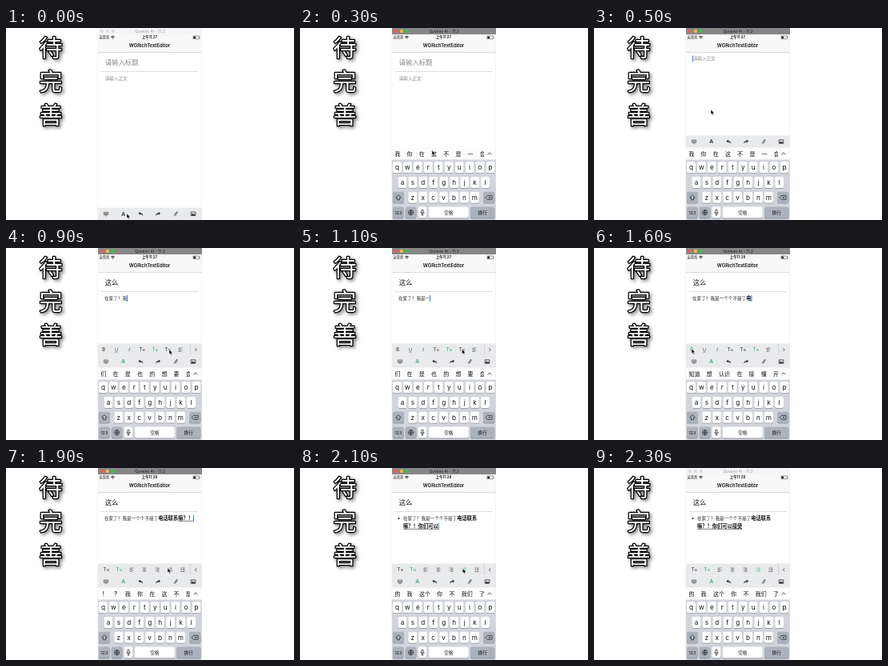
Write an HTML page with a canvas that moves like this. It is 360 px wide and 240 px high and loops after 2.4 s.

```html
<!DOCTYPE html>
<html lang="zh-CN">
<meta charset="utf-8">
<style>
html, body { margin: 0; height: 100%; overflow: hidden; background: #fff }
canvas { display: block }
</style>
<canvas id="stage" width="360" height="240"></canvas>
<script>
const c = document.getElementById('stage').getContext('2d');
const FONT = 'Inter, "Noto Sans CJK SC", "Noto Sans CJK", sans-serif';
const CJK = '"Noto Sans CJK SC", "Noto Sans CJK", sans-serif';
const GREEN = '#36b67b', INK = '#333';
const BODY = '在家了？我是一个个不接了电话联系嘛？！你们可以接受';
const BOLD_AT = 12, LINE_AT = 16;
// Characters typed in the body at each step
const TYPED = [0, 0, 0, 0, 0, 0, 1, 2, 4, 5, 6, 7, 8, 9, 10, 12, 13, 15, 17, 19, 21, 23, 25, 25];
// Pointer path: step, x, y
const POINTER = [[0, 151, 232], [1, 149, 46], [3, 165, 153], [5, 146, 102], [7, 147, 141],
  [9, 204, 127], [14, 200, 126], [15, 202, 126], [16, 122, 126], [17, 237, 126], [19, 202, 125], [22, 204, 126]];
// Suggestions: first step, words
const WORDS = [[0, '我 你 在 这 不 是 一 会'], [9, '们 在 是 也 的 想 要 会'],
  [14, '知道 想 认识 在 接 懂 开心'], [19, '! ? 我 你 在 这 不 是'], [20, '的 我 这个 你 不 我们 了']];

function box(x, y, w, h, color, r = 0) {
  c.fillStyle = color;
  c.beginPath();
  c.roundRect(x, y, w, h, r);
  c.fill();
}

function text(s, x, y, size, color = '#111', align = 'center', weight = 400, font = FONT) {
  c.font = `${weight} ${size}px ${font}`;
  c.textAlign = align;
  c.textBaseline = 'middle';
  c.fillStyle = color;
  c.fillText(s, x, y);
}

function icon(path, x, y, color = INK, width = .8, fill) {
  c.save();
  c.translate(x, y);
  c.lineWidth = width;
  c.strokeStyle = color;
  const p = new Path2D(path);
  if (fill) {
    c.fillStyle = fill;
    c.fill(p);
  }
  c.stroke(p);
  c.restore();
}

function clip(x, y, w, h, draw) {
  c.save();
  c.beginPath();
  c.rect(x, y, w, h);
  c.clip();
  draw();
  c.restore();
}

const disc = (x, y, r, color) => box(x - r, y - r, 2 * r, 2 * r, color, r);

function heading() {
  [...'待完善'].forEach((ch, i) => {
    const y = 25 + 42 * i;
    c.save();
    c.shadowColor = 'rgba(0,0,0,.5)';
    c.shadowBlur = 4;
    c.shadowOffsetX = c.shadowOffsetY = 2;
    c.font = `500 29px ${CJK}`;
    c.textAlign = 'center';
    c.textBaseline = 'middle';
    c.lineJoin = 'round';
    c.lineWidth = 2.5;
    c.strokeStyle = '#000';
    c.strokeText(ch, 56, y);
    c.restore();
    text(ch, 56, y, 29, '#fff', 'center', 500, CJK);
  });
}

function chrome(step) {
  const active = step > 0 && step < 23;
  box(115, 0, 130, 8, active ? '#868686' : '#f5f5f5');
  ['#fb5b55', '#f5b935', '#35c649'].forEach((col, i) => disc(120 + 6.8 * i, 3.9, 2.2, active ? col : '#dcdcdc'));
  text('Quveno 4t - 11.2', 180, 4.2, 4.9, active ? '#1c1c1c' : '#999');
  box(115, 8, 130, 22.5, '#f8f8f8');
  box(115, 30.5, 130, .5, '#bbb');
  text('运营商', 116.5, 11.8, 4.2, '#111', 'left', 500);
  icon('M-2.2-.6Q0-2.6 2.2-.6M-1.2.5Q0-.6 1.2.5M-.3 1.4H.3', 133.5, 11.8, '#111', 1);
  text(step < 15 ? '上午11:27' : '上午11:28', 179.5, 11.8, 4.4, '#111', 'center', 600);
  icon('M0 0H7.5V3.6H0ZM8.5 1.2V2.4', 234, 10, '#333', .5);
  box(234.5, 10.5, 2.4, 2.6, '#111');
  text('WGRichTextEditor', 179.5, 22.7, 5.9, '#111', 'center', 600);
}

function caret(x, y, h = 8) {
  box(x, y - h / 2, 1, h, '#3f78e0');
}

function body(step, y) {
  const n = TYPED[step], list = step >= 20;
  if (!n) {
    text('请输入正文', 123.7, y, 5.6, '#888', 'left');
    if (step == 5) caret(122.8, y);
    return;
  }
  const left = list ? 129 : 123;
  let x = left;
  if (list) disc(123.5, y, 1, '#111');
  for (let i = 0; i < n; i++) {
    if (list && i == LINE_AT) { x = left; y += 10; }
    const bold = i >= BOLD_AT, size = bold ? 6.25 : 5.6;
    text(BODY[i], x, y, size, bold ? '#111' : '#222', 'left', bold ? 700 : 400, CJK);
    if (i >= LINE_AT) box(x, y + 3, size, .6, '#222');
    x += size;
  }
  if (step < 23) caret(x, y);
}

function page(step) {
  const scroll = step == 5 || step == 6 ? 24.5 : 0;
  clip(115, 31, 130, 209, () => {
    const typed = step >= 4;
    text(typed ? '这么' : '请输入标题', 123.7, 43.4 - scroll, 8.4, typed ? '#111' : '#888', 'left');
    if (step == 2 || step == 4) caret(step == 4 ? 140.8 : 123, 43, 10);
    for (let x = 119; x < 241; x += 2) box(x, 54 - scroll, 1, .7, '#aaa');
    body(step, 62.9 - scroll);
  });
}

function toolbar(y, on) {
  box(115, y - 7.5, 130, 15, '#e9eaec');
  icon('M-2.6-2H2.6V1.3H-2.6ZM-1.8-.9H1.8M-1.8.3H1.8M-1 2.6H1', 125, y, '#555', .7);
  text('A', 146.8, y + .3, 6.5, on ? GREEN : INK, 'center', 700);
  icon('M-2.8-.5L-.7-2.2V-1.1Q2.6-1 2.8 2.2Q1.6.2-.7.2V1.2Z', 168.3, y, INK, .3, INK);
  icon('M2.8-.5L.7-2.2V-1.1Q-2.6-1-2.8 2.2Q-1.6.2 .7.2V1.2Z', 190.2, y, INK, .3, INK);
  icon('M-2 2.3L1-2.3M-.5 2.5L2.3-1.8M1-2.3Q2-3 2.3-1.8', 212, y, INK, .8);
  icon('M-2.8-2.2H2.8V2.2H-2.8Z', 234, y, INK, .8);
  icon('M-2.5 2L-.8-.6L.4.9L1.3 0L2.5 2Z', 234, y, INK, .3, INK);
}

function formats(step) {
  const y = 127.2, scrolled = step >= 17, grey = '#4a4a4a';
  box(115, 119.5, 130, 15, '#e9eaec');
  clip(115, 119, 115, 16, () => {
    const at = i => 122 + 16 * i - (scrolled ? 61 : 0);
    text('B', at(0), y, 5.6, step >= 16 ? GREEN : grey, 'center', 600);
    text('U', at(1), y - .3, 5.4, grey);
    box(at(1) - 2, y + 2.6, 4, .5, grey);
    text('I', at(2), y, 6, grey, 'center', 'italic 400', '"Liberation Serif", serif');
    [14, 16, 18].forEach((size, i) => {
      const col = i == (step >= 15 ? 2 : 1) ? GREEN : grey;
      text('T', at(3 + i) - 1.6, y, 6, col, 'center', 500);
      text(size, at(3 + i) + 2, y + .8, 3.4, col, 'center', 500);
    });
    // Left, centred and right alignment
    [-2.5, -1.5, -.5].forEach((x, i) =>
      icon(`M-2.5-2.2H2.5M${x}-.7H${x + 3}M-2.5.8H2.5M${x} 2.3H${x + 3}`, at(6 + i), y, grey, .6));
    icon('M-.8-2H2.7M-.8 0H2.7M-.8 2H2.7M-2.7-2H-1.9M-2.7 0H-1.9M-2.7 2H-1.9', at(9), y, step >= 20 ? GREEN : grey, .7);
    icon('M-2.5-2.2H2.5M0-.7H2.5M0 .8H2.5M-2.5 2.3H2.5M-2.5-1L-1 0L-2.5 1', at(10), y, grey, .6);
  });
  box(230, 120, .6, 14, '#c5c6c8');
  icon(scrolled ? 'M1-2L-1 0L1 2' : 'M-1-2L1 0L-1 2', 237.3, y, '#444', .8);
}

function key(x, y, w, label, dark, size = 8.2) {
  box(x, y + .8, w, 14, '#8d9197', 2);
  box(x, y, w, 14, dark ? '#abb2bd' : '#fff', 2);
  if (label) text(label, x + w / 2, y + 7.4, size);
}

function keyboard(step, dy) {
  c.save();
  c.translate(0, dy);
  box(115, 149, 130, 91, '#d1d5db');
  box(115, 149, 130, 15.5, '#fcfcfd');
  const words = WORDS.filter(w => w[0] <= step).pop()[1].split(' ');
  clip(115, 149, 115, 16, () => {
    let x = 114.3;
    for (const w of words) {
      const width = 8 + 7.2 * w.length;
      text(w, x + width / 2, 157.4, 7, '#111', 'center', 500);
      x += width;
    }
  });
  icon('M-2.4 1.3L0-1.2L2.4 1.3', 237, 157, '#333', .8);
  ['qwertyuiop', 'asdfghjkl', 'zxcvbnm'].forEach((row, r) =>
    [...row].forEach((ch, i) => key([116, 122.5, 135.3][r] + 12.95 * i, 167.2 + 18.8 * r, 10.9, ch)));
  key(116, 204.8, 14, '', true);
  icon('M0-3.2L3.3.3H1.6V3H-1.6V.3H-3.3Z', 123, 211.7, '#222', .7);
  key(229, 204.8, 14.3, '', true);
  icon('M-4 0L-1.6-2.5H4V2.5H-1.6ZM0-1L2 1M2-1L0 1', 236, 211.8, '#222', .7);
  key(116, 223.6, 13.6, '123', true, 5.4);
  key(131.8, 223.6, 13.6, '', true);
  icon('M-3.2 0A3.2 3.2 0 1 1 3.2 0A3.2 3.2 0 1 1-3.2 0M-3.2 0H3.2M0-3.2V3.2M0-3.2Q-3 0 0 3.2Q3 0 0-3.2', 138.6, 230.6, '#222', .6);
  key(147.5, 223.6, 11, '');
  icon('M-1.1-3.3H1.1V.4H-1.1ZM-2.2-.5Q-2.2 1.8 0 1.8Q2.2 1.8 2.2-.5M0 1.8V3.4M-1.3 3.4H1.3', 153, 230.6, '#222', .7);
  key(160.8, 223.6, 50, '空格', false, 5.6);
  key(213, 223.6, 30.3, '换行', true, 5.6);
  c.restore();
}

function pointer(step) {
  const i = POINTER.findIndex(p => p[0] >= step);
  if (i < 0) return;
  const b = POINTER[i], a = POINTER[i - 1] || b;
  const k = a == b ? 0 : (step - a[0]) / (b[0] - a[0]);
  icon('M0 0V6L1.4 4.7L2.4 6.9L3.5 6.4L2.6 4.3H4.4Z', a[1] + (b[1] - a[1]) * k, a[2] + (b[2] - a[2]) * k, '#fff', .5, '#000');
}

function draw(step) {
  box(0, 0, 360, 240, '#fff');
  heading();
  page(step);
  chrome(step);
  if (step < 2) toolbar(232.3);
  else {
    keyboard(step, step == 2 ? 45 : 0);
    if (step >= 5) toolbar(142, step >= 7);
    if (step >= 7) formats(step);
  }
  box(114.6, 8, .4, 232, '#e6e6e6');
  box(244.6, 8, .4, 232, '#e6e6e6');
  pointer(step);
}

function tick() {
  draw(Math.floor(performance.now() % 2400 / 100));
  requestAnimationFrame(tick);
}
tick();
</script>
</html>
```
